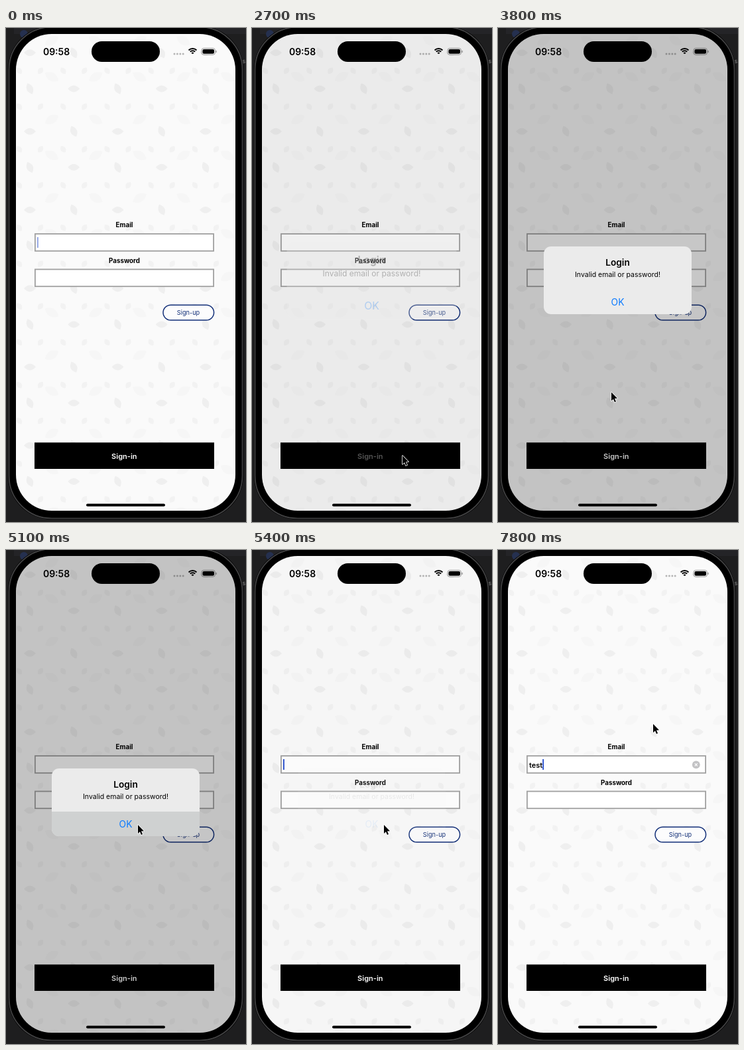
Animation of 362x744 px, one loop 8000 ms. Source, as an HTML page with a canvas:

```html
<!DOCTYPE html>
<html lang="en">
<head>
<meta charset="utf-8">
<title>Sign-in screen</title>
<style>
html, body { margin: 0; width: 100%; height: 100%; overflow: hidden; background: #1e1e1f; }
canvas { display: block; width: 362px; height: 744px; }
</style>
</head>
<body>
<canvas id="stage"></canvas>
<script>
const W = 362, H = 744, LOOP = 8000, STEP = 100;
const PRESS = 2400, ALERT_IN = 2600, OK_DOWN = 5100, ALERT_OUT = 5200;
const KEY_TIMES = [6700, 7400, 7700, 7800];
const screenBox = [15, 9, 331, 718];
const navy = '#122f78';

const canvas = document.getElementById('stage');
const dpr = window.devicePixelRatio || 1;
canvas.width = W * dpr;
canvas.height = H * dpr;
const ctx = canvas.getContext('2d');

const clamp = (v, lo = 0, hi = 1) => Math.min(hi, Math.max(lo, v));
const progress = (t, from, to) => clamp((t - from) / (to - from));
const smooth = s => s * s * (3 - 2 * s);
const easeOut = s => 1 - (1 - s) ** 3;

// The pointer travels along bent paths between resting places
const moves = [
  { start: 1300, end: 2200, ease: smooth, from: [298, 403], bend: [417, 520], to: [227, 644] },
  { start: 3700, end: 4400, ease: easeOut, from: [227, 644], bend: [115, 507], to: [199, 414] },
  { start: 5500, end: 6000, ease: smooth, from: [199, 414], bend: [212, 350], to: [234, 262] }
];

function pointerAt(t) {
  const move = moves.findLast(m => t >= m.start) || moves[0];
  const s = move.ease(progress(t, move.start, move.end)), r = 1 - s;
  return [0, 1].map(i => r * r * move.from[i] + 2 * r * s * move.bend[i] + s * s * move.to[i]);
}

// Critically damped entry, smooth exit
function alertLevel(t) {
  if (t < ALERT_IN) return 0;
  const k = (t - ALERT_IN) / 100;
  return t < ALERT_OUT ? 1 - (1 + k) * Math.exp(-k)
    : 1 - smooth(progress(t, ALERT_OUT, ALERT_OUT + 240));
}

// One blink a second, hidden while the alert is up and solid while typing
function caretAlpha(t) {
  if (t >= KEY_TIMES[0]) return 1;
  if (t > PRESS && t < ALERT_OUT + STEP) return 0;
  const phase = (t < ALERT_OUT ? t : t + 200) % 1000;
  return clamp((Math.abs(phase - 200) - 100) / 200);
}

function rect(x, y, w, h, color) {
  ctx.fillStyle = color;
  ctx.fillRect(x, y, w, h);
}

function roundPath(x, y, w, h, r) {
  ctx.beginPath();
  ctx.roundRect(x, y, w, h, r);
}

function pill(x, y, w, h, r, color) {
  roundPath(x, y, w, h, r);
  ctx.fillStyle = color;
  ctx.fill();
}

function outline(x, y, w, h, r, color, line) {
  roundPath(x, y, w, h, r);
  ctx.strokeStyle = color;
  ctx.lineWidth = line;
  ctx.stroke();
}

function disc(x, y, r, color) {
  ctx.beginPath();
  ctx.arc(x, y, r, 0, Math.PI * 2);
  ctx.fillStyle = color;
  ctx.fill();
}

function withAlpha(alpha, paint) {
  ctx.globalAlpha = alpha;
  paint();
  ctx.globalAlpha = 1;
}

// y is the middle of the capitals
function text(str, x, y, size, weight, color = '#000', align = 'center') {
  ctx.font = `${weight} ${size}px Inter, "Liberation Sans", sans-serif`;
  ctx.textAlign = align;
  ctx.fillStyle = color;
  ctx.fillText(str, x, y + size * .364);
}

function leaf(x, y, len, wid, deg, dark) {
  ctx.save();
  ctx.translate(x, y);
  ctx.rotate(deg * Math.PI / 180);
  ctx.beginPath();
  ctx.moveTo(-len / 2, 0);
  ctx.quadraticCurveTo(0, -wid, len / 2, 0);
  ctx.quadraticCurveTo(0, wid, -len / 2, 0);
  ctx.fillStyle = `rgba(0,0,0,${dark})`;
  ctx.fill();
  ctx.restore();
}

// A lattice of leaves, each with a mirrored pair below it
function drawPattern() {
  const dx = 66.25, dy = 59.15;
  for (let row = -1; row * dy < H; row++) {
    for (let col = 0; col * dx < W; col++) {
      const odd = (row + col) & 1;
      const x = 36 + col * dx, y = 94 + (row - 1) * dy + (row & 1 ? -2.5 : 2.5);
      leaf(x, y, 18, 10, odd ? 65 : 0, .045);
      leaf(x + 33, y - 18, 24, 13, odd ? 30 : -30, .015);
      for (const side of [-1, 1]) leaf(x + side * 16, y + 27, 12, 8, side * -55, .03);
    }
  }
}

function drawPhone() {
  rect(0, 0, W, H, '#1e1e1f');
  rect(12, 0, W, 9, '#242427');
  disc(27, 9, 6, '#25304f');
  text('s', 359, 50, 9, 400, '#888');
  pill(3, -3, 355, 743, 66, '#000');
  outline(4.5, -1.5, 352, 740, 64.5, '#454546', 1.6);
}

function drawStatus() {
  text('09:58', 76, 35.5, 14, 600);
  pill(129, 20, 103, 31, 15.5, '#000');
  for (let i = 0; i < 4; i++) disc(254 + i * 4.4, 39, 1.5, '#b5b5b5');

  ctx.strokeStyle = '#000';
  ctx.lineWidth = 2;
  for (const r of [1.8, 5.2, 8.4]) {
    ctx.beginPath();
    ctx.arc(281.5, 39.5, r, -Math.PI * .75, -Math.PI * .25);
    ctx.stroke();
  }

  outline(295, 30.5, 20.5, 9.8, 3.2, '#9a9a9a', 1);
  pill(296.5, 32, 17.5, 6.8, 2, '#000');
  pill(316.5, 33.8, 1.3, 3.4, .6, '#9a9a9a');
}

function drawField(label, y) {
  text(label, 178.5, y - 12.6, 9.8, 700);
  rect(43, y, 271, 27.5, '#a0a0a0');
  rect(44.8, y + 1.8, 267.4, 23.9, '#fff');
}

function drawClearButton() {
  const x = 298.8, y = 323.4;
  disc(x, y, 5.9, '#c3c3c5');
  ctx.strokeStyle = '#fff';
  ctx.lineWidth = 1.2;
  ctx.beginPath();
  for (const d of [-2, 2]) {
    ctx.moveTo(x - 2, y + d);
    ctx.lineTo(x + 2, y - d);
  }
  ctx.stroke();
}

function drawForm(t) {
  drawField('Email', 309.2);
  drawField('Password', 362.6);

  const value = 'test'.slice(0, KEY_TIMES.filter(k => k <= t).length);
  text(value, 47, 323.5, 11, 600, '#000', 'left');
  const caretX = 47 + ctx.measureText(value).width;
  withAlpha(caretAlpha(t), () => rect(caretX, 315, 1.8, 16, '#2149cc'));
  withAlpha(progress(t, 6800, 7000), drawClearButton);

  pill(237, 417.2, 76.6, 22.8, 11.4, '#fcfcfd');
  outline(237, 417.2, 76.6, 22.8, 11.4, navy, 1.5);
  text('Sign-up', 275, 429, 9.2, 400, navy);

  rect(43, 624.3, 271, 39.7, '#000');
  const lit = t < PRESS ? 1 : .35 + .65 * progress(t, 2700, 2900);
  withAlpha(lit, () => text('Sign-in', 178.3, 644.5, 11, 600, '#fff'));
}

function drawAlert(t, level) {
  const x = 180.5, y = 380;
  const scale = t < ALERT_OUT ? 1.2 - .2 * level : 1;
  ctx.save();
  ctx.translate(x, y);
  ctx.scale(scale, scale);
  ctx.translate(-x, -y);
  ctx.globalAlpha = level;
  pill(69, 329, 223, 102, 11, '#ebebeb');
  if (t >= OK_DOWN && t <= ALERT_OUT) pill(69, 394, 223, 37, [0, 0, 11, 11], '#cfd1d1');
  text('Login', x, 353.5, 13.7, 600);
  text('Invalid email or password!', x, 371, 10.5, 400);
  text('OK', x, 413.3, 13.8, 400, '#0a7aff');
  ctx.restore();
}

function drawPointer([x, y]) {
  const shape = [[0, 0], [0, 13], [3, 10.3], [5, 15], [7, 14.1], [5, 9.5], [9, 9.2]];
  ctx.beginPath();
  for (const [dx, dy] of shape) ctx.lineTo(x + dx, y + dy);
  ctx.closePath();
  ctx.lineJoin = 'round';
  ctx.strokeStyle = '#fff';
  ctx.lineWidth = 1.6;
  ctx.stroke();
  ctx.fillStyle = '#000';
  ctx.fill();
}

function draw(t) {
  ctx.setTransform(dpr, 0, 0, dpr, 0, 0);
  drawPhone();

  ctx.save();
  roundPath(...screenBox, 54);
  ctx.clip();
  rect(...screenBox, '#fafafa');
  drawPattern();
  drawForm(t);
  drawStatus();
  pill(121, 716.5, 119, 4, 2, '#000');
  const level = alertLevel(t);
  if (level > 0) {
    rect(...screenBox, `rgba(0,0,0,${.22 * level})`);
    drawAlert(t, level);
  }
  ctx.restore();

  if (t >= 1000) drawPointer(pointerAt(t));
}

const start = performance.now();
function tick() {
  const t = (performance.now() - start) % LOOP;
  draw(Math.floor(t / STEP) * STEP);
  requestAnimationFrame(tick);
}
tick();
</script>
</body>
</html>
```
